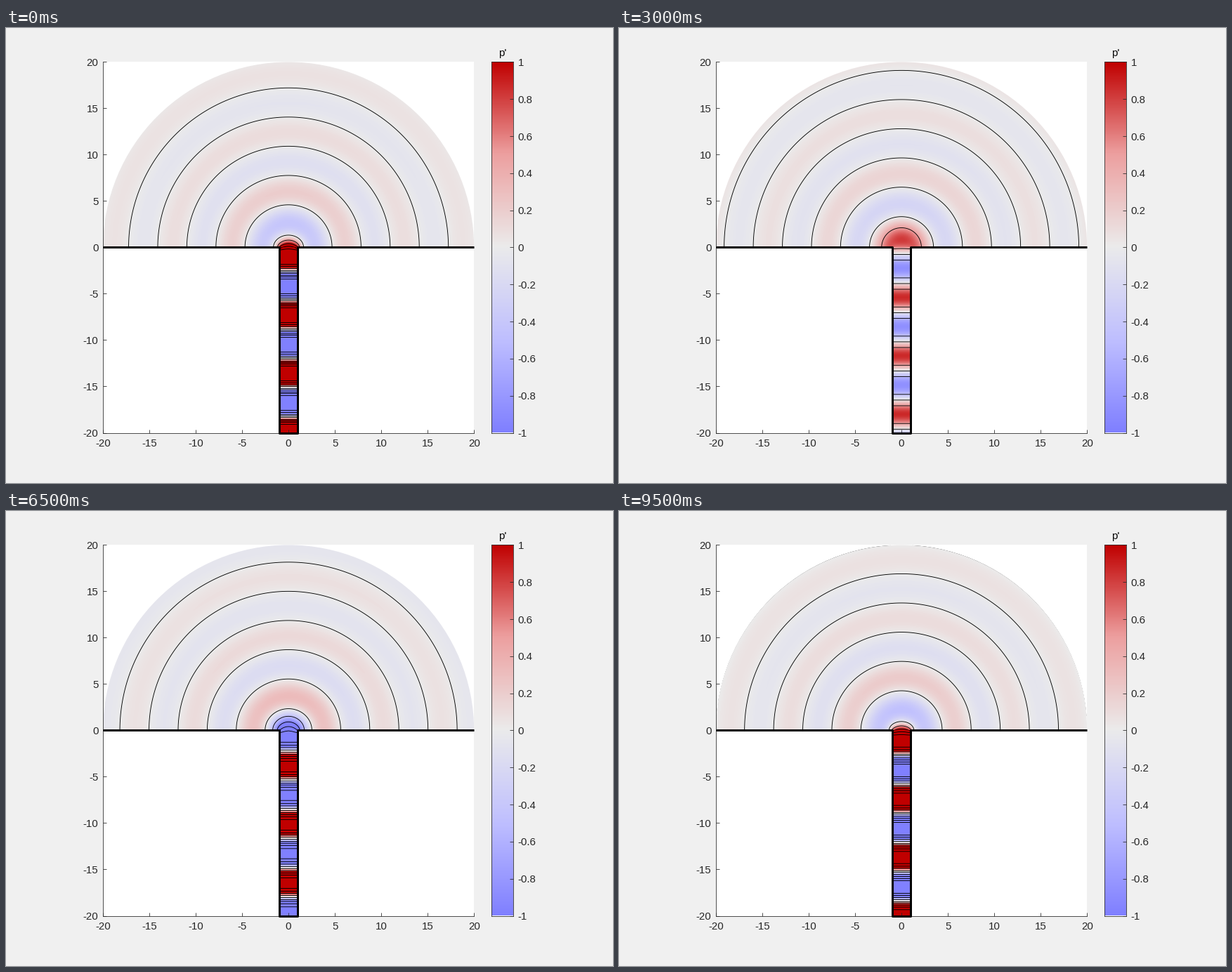
These frames come from a looping animation (864x648 px, 10000 ms). A matplotlib script:

```python
import numpy as np
import matplotlib.pyplot as plt
from matplotlib.animation import FuncAnimation
from matplotlib.colors import LinearSegmentedColormap
from matplotlib.patches import Rectangle, Wedge

# Sound leaving a flanged circular pipe (radius 1, wavenumber 1).
FRAMES = 20
INTERVAL = 500
WIDTH, HEIGHT = 864, 648
TOP, BOTTOM = 48.4, 576.5
STEP = 0.05
INK = "#262626"
LEVELS = np.arange(-2, 2.01, 0.5)

plt.rcParams.update({"font.family": "Liberation Sans", "font.size": 15})


# Bessel function J0, tabulated from its integral form
angles = (np.arange(500) + 0.5) * np.pi / 500
table_x = np.linspace(0, 805, 20001)
table_y = np.cos(np.outer(table_x, np.sin(angles))).mean(axis=1)


def j0(x):
    return np.interp(x, table_x, table_y)


def midpoints(end, count):
    step = end / count
    return (np.arange(count) + 0.5) * step, step


def solve_field():
    """Match pipe modes to the radiating half space; return both pressures."""
    a, da = midpoints(np.pi / 2, 400)
    s, ds = midpoints(np.arccosh(40), 5000)
    kappa = np.concatenate([np.sin(a), np.cosh(s)])
    decay = np.concatenate([1j * np.cos(a), np.sinh(s)])
    weight = np.concatenate([1j * np.sin(a) * da, -np.cosh(s) * ds])

    alpha = np.array([0, 3.83171, 7.01559, 10.17347, 13.32369, 16.47063])
    gamma = np.sqrt(alpha**2 - 1 + 0j)
    first = np.eye(len(alpha))[0]

    x, w = np.polynomial.legendre.leggauss(60)
    rq = (x + 1) / 2
    wq = w / 2 * rq
    modes = j0(np.outer(rq, alpha))
    norm = wq @ modes**2
    spectra = (j0(np.outer(kappa, rq)) * wq) @ modes
    imp = spectra.T @ (weight[:, None] * spectra)
    refl = np.linalg.solve(np.diag(norm) - imp * gamma,
                           -1j * imp[:, 0] - norm * first)

    # half space above the flange: rows are z, columns r
    axis = np.arange(0, 20 + STEP / 2, STEP)
    source = weight * (spectra @ (gamma * refl - 1j * first))
    outer = (np.exp(-np.outer(axis, decay)) * source) @ j0(np.outer(kappa, axis))

    # inside the pipe
    z = axis - 20
    r = np.arange(0, 1 + STEP / 2, STEP)
    shapes = j0(np.outer(alpha, r))
    inner = (np.exp(np.outer(z, gamma)) * refl) @ shapes
    inner = inner + np.exp(-1j * z)[:, None]

    # unit velocity at the inlet; the loop starts with a zero at z = 14.06
    speed = abs(np.exp(20j) - refl[0] * np.exp(-20j))
    far = outer[int(round(14.1 / STEP)), 0]
    scale = -1j * np.exp(-1j * (14.1 - 14.06)) * abs(far) / far / speed
    return axis, outer * scale, z, r, inner * scale


def mirror(r, p):
    return (np.concatenate([-r[:0:-1], r]),
            np.concatenate([p[:, :0:-1], p], axis=1))


axis, outer, z_pipe, r_pipe, inner = solve_field()
x_outer, outer = mirror(axis, outer)
x_inner, inner = mirror(r_pipe, inner)

colors = [(128, 128, 255), (191, 191, 255), (235, 235, 235),
          (237, 160, 160), (192, 0, 0)]
cmap = LinearSegmentedColormap.from_list(
    "pressure", [tuple(v / 255 for v in c) for c in colors], N=256)

fig = plt.figure(figsize=(WIDTH / 72, HEIGHT / 72), dpi=72, facecolor="#f0f0f0")


def add_axes(left, right):
    return fig.add_axes([left / WIDTH, 1 - BOTTOM / HEIGHT,
                         (right - left) / WIDTH, (BOTTOM - TOP) / HEIGHT])


ax = add_axes(138, 666.2)
ticks = np.arange(-20, 21, 5)
names = [str(t) for t in ticks]
ax.set_xticks(ticks, names)
ax.set_yticks(ticks, names)
ax.tick_params(direction="in", length=5, width=0.8, color=INK, labelcolor=INK)
ax.tick_params(axis="x", pad=8.5)
ax.tick_params(axis="y", pad=6.5)
ax.spines[["top", "right"]].set_visible(False)
ax.spines[["left", "bottom"]].set(color=INK, linewidth=0.8)

bar = add_axes(691, 722)
bar.imshow(np.linspace(-1, 1, 256)[:, None], cmap=cmap, origin="lower",
           extent=(0, 1, -1, 1), aspect="auto")
bar.set_xticks([])
bar_ticks = np.arange(-5, 6) / 5
bar.set_yticks(bar_ticks, [f"{t:g}" for t in bar_ticks])
bar.yaxis.tick_right()
bar.tick_params(direction="in", length=5, width=0.8, color=INK,
                labelcolor=INK, pad=6.5)
bar.spines[:].set(color=INK, linewidth=0.8)
fig.text(706.5 / WIDTH, 1 - 40 / HEIGHT, "p'", ha="center", va="baseline")


class Region:
    """A coloured, contoured part of the field."""

    def __init__(self, x, z, pressure, clip):
        self.x, self.z, self.pressure, self.clip = x, z, pressure, clip
        h = STEP / 2
        self.image = ax.imshow(
            pressure.real, cmap=cmap, vmin=-1, vmax=1, origin="lower",
            extent=(x[0] - h, x[-1] + h, z[0] - h, z[-1] + h),
            aspect="auto", interpolation="bilinear", zorder=1)
        self.image.set_clip_path(clip)
        self.lines = None

    def show(self, turn):
        p = (self.pressure * turn).real
        self.image.set_data(p)
        if self.lines is not None:
            self.lines.remove()
        self.lines = ax.contour(self.x, self.z, p, LEVELS, colors="black",
                                linewidths=0.9, linestyles="solid", zorder=2)
        self.lines.set_clip_path(self.clip)


regions = [
    Region(x_outer, axis, outer,
           Wedge((0, 0), 20, 0, 180, transform=ax.transData)),
    Region(x_inner, z_pipe, inner,
           Rectangle((-1, -20), 2, 20, transform=ax.transData)),
]
ax.set(xlim=(-20, 20), ylim=(-20, 20))

ax.plot([-20, -1, -1, 1, 1, 20], [0, 0, -20, -20, 0, 0], color="black", lw=3,
        solid_capstyle="butt", solid_joinstyle="round", clip_on=False, zorder=3)


def update(frame):
    turn = np.exp(2j * np.pi * frame / FRAMES)
    for region in regions:
        region.show(turn)
    return []


anim = FuncAnimation(fig, update, frames=FRAMES, interval=INTERVAL,
                     repeat=True, repeat_delay=0, blit=False)
plt.show()
```
